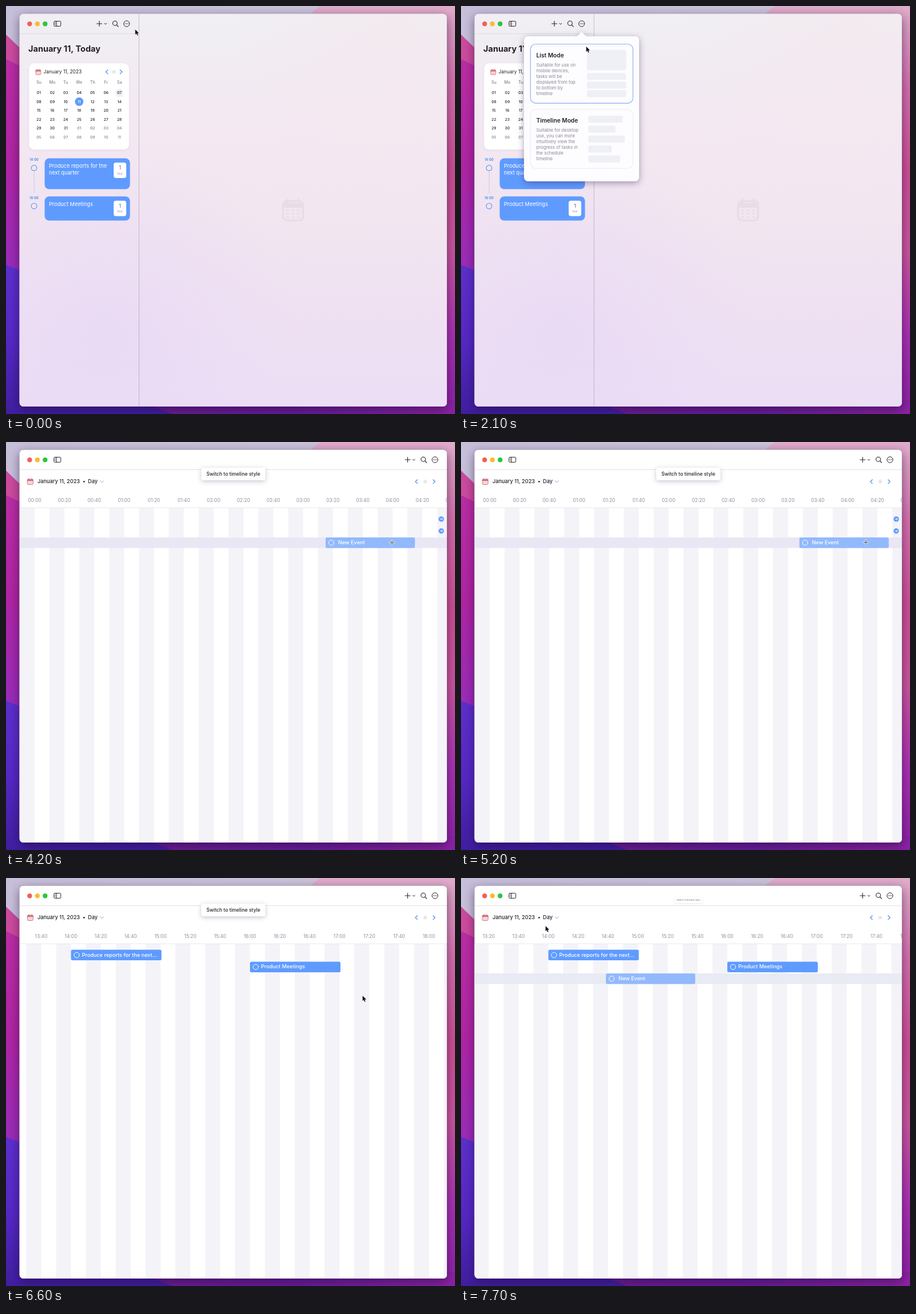
An HTML page with a canvas for the animation above (7.8 s loop, 784 px wide and 714 px high).

```html
<!DOCTYPE html>
<html lang="en">
<head>
<meta charset="utf-8">
<title>Calendar modes</title>
<style>
html, body { margin: 0; width: 100%; height: 100%; overflow: hidden; }
canvas { display: block; width: 784px; height: 714px; }
</style>
</head>
<body>
<canvas id="stage" width="784" height="714"></canvas>
<script>
let ctx = document.getElementById('stage').getContext('2d');
const LOOP = 7800, STEP = 100;
const BLUE = '#5f9bff', INK = '#232128', ROW = 20.85, HOUR = 156.25;

// Keyframes are [time, value...] rows, interpolated linearly.
function at(keys, t) {
  if (t <= keys[0][0]) return keys[0].slice(1);
  for (let i = 1; i < keys.length; i++) {
    const a = keys[i - 1], b = keys[i];
    if (t <= b[0]) {
      const k = (t - a[0]) / (b[0] - a[0]);
      return a.slice(1).map((v, j) => v + (b[j + 1] - v) * k);
    }
  }
  return keys[keys.length - 1].slice(1);
}
const POINTER = [
  [0, 226, 41], [500, 212, 29], [800, 211, 31], [1300, 214, 52], [1500, 218, 66],
  [2100, 219, 71], [2400, 228, 100], [3000, 274, 236], [3300, 276, 238], [3600, 290, 240],
  [3900, 470, 222], [4200, 674, 176], [4700, 684, 177], [5400, 716, 175], [5700, 762, 135],
  [5900, 762, 135], [6300, 700, 180], [6600, 623, 206], [6900, 540, 200], [7200, 426, 178],
  [7400, 369, 172], [7700, 148, 84]
];
const SCROLL = [[6000, 2187.5], [6400, 2187.5], [6600, 2124], [6900, 2085]];
const TIMELINE_ALPHA = [[3200, 0], [3300, 0.27], [3400, 0.62], [3500, 0.88], [3600, 1]];
const BADGE_X = [[3300, 585], [3400, 680], [3500, 733], [3600, 755], [3700, 760]];
const POPOVER = [[600, 0.8, 0], [700, 0.9, 0.5], [800, 1, 1], [3200, 1, 1],
  [3300, 0.987, 1], [3400, 0.92, 0.6], [3500, 0.86, 0.2], [3600, 0.8, 0]];
const TIP = [[3300, 0.3, 0], [3400, 0.44, 0.4], [3500, 0.87, 0.9], [3600, 1, 1],
  [7600, 1, 1], [7700, 0.44, 0.5]];

function fade(alpha, draw) {
  ctx.save();
  ctx.globalAlpha *= alpha;
  draw();
  ctx.restore();
}
function text(s, x, y, size, color = INK, weight = 400, align = 'left') {
  ctx.font = `${weight} ${size}px Inter, sans-serif`;
  ctx.textAlign = align;
  ctx.textBaseline = 'middle';
  ctx.fillStyle = color;
  ctx.fillText(s, x, y);
}
function rect(x, y, w, h, color) {
  ctx.fillStyle = color;
  ctx.fillRect(x, y, w, h);
}
function box(x, y, w, h, r, fill, stroke, width = 1) {
  ctx.beginPath();
  ctx.roundRect(x, y, w, h, r);
  paint(fill, stroke, width);
}
function circle(x, y, r, fill, stroke, width = 1) {
  ctx.beginPath();
  ctx.arc(x, y, r, 0, Math.PI * 2);
  paint(fill, stroke, width);
}
function paint(fill, stroke, width) {
  if (fill) { ctx.fillStyle = fill; ctx.fill(); }
  if (stroke) { ctx.strokeStyle = stroke; ctx.lineWidth = width; ctx.stroke(); }
}
function trace(points) {
  ctx.beginPath();
  for (let i = 0; i < points.length; i += 2) ctx.lineTo(points[i], points[i + 1]);
}
function line(points, color, width = 1) {
  trace(points);
  ctx.lineCap = ctx.lineJoin = 'round';
  paint(null, color, width);
}
function poly(points, fill) {
  trace(points);
  ctx.closePath();
  paint(fill);
}
function ramp(x0, y0, x1, y1, ...colors) {
  const g = ctx.createLinearGradient(x0, y0, x1, y1);
  colors.forEach((c, i) => g.addColorStop(i / (colors.length - 1), c));
  return g;
}
function glow(x, y, r, color) {
  const g = ctx.createRadialGradient(x, y, 0, x, y, r);
  g.addColorStop(0, color);
  g.addColorStop(1, color.replace(/[\d.]+\)$/, '0)'));
  rect(0, 0, 784, 714, g);
}
function shadow(color, blur, dy, draw) {
  ctx.save();
  ctx.shadowColor = color;
  ctx.shadowBlur = blur;
  ctx.shadowOffsetY = dy;
  draw();
  ctx.restore();
}
// Draws a still part once so that it can be reused as an image.
function layer(draw) {
  const canvas = document.createElement('canvas'), screen = ctx;
  canvas.width = 784;
  canvas.height = 714;
  ctx = canvas.getContext('2d');
  draw();
  ctx = screen;
  return canvas;
}

function wallpaper() {
  rect(0, 0, 784, 714, ramp(0, 0, 560, 0, '#c6bfd9', '#cbc3da'));
  poly([548, 0, 784, 0, 784, 714, 300, 714, 300, 200],
    ramp(0, 0, 0, 714, '#dfadca', '#d36eaa', '#cb4f93', '#c8559c', '#a931b1', '#8c20a4'));
  poly([0, 50, 60, 108, 60, 500, 0, 500], '#cb4a9d');
  poly([0, 93, 60, 122, 60, 500, 0, 500], ramp(0, 93, 0, 460, '#b92da2', '#ae24a3', '#982cb7'));
  poly([0, 453, 60, 476, 330, 714, 0, 714], ramp(0, 453, 0, 714, '#5c2fcb', '#5428c4', '#3f1e9f'));
  poly([230, 690, 784, 690, 784, 714, 290, 714], ramp(230, 0, 784, 0, '#6b1c94', '#671d9a', '#8a22a2'));
}
function windowPath() {
  ctx.beginPath();
  ctx.roundRect(23.5, 13.5, 746.5, 687.5, 7);
}
function inWindow(draw) {
  ctx.save();
  windowPath();
  ctx.clip();
  draw();
  ctx.restore();
}
function glass() {
  rect(0, 0, 784, 714, ramp(0, 14, 0, 701, '#f0eff3', '#f3e9f2', '#f2e6f0', '#efe1f2', '#ebdef5'));
  glow(170, 560, 330, 'rgba(232,216,246,0.7)');
  glow(680, 60, 280, 'rgba(246,230,237,0.5)');
}

function calendarIcon(x, y, s, color, body) {
  box(x - 5 * s, y - 4.5 * s, 10 * s, 9.7 * s, 2 * s, body, color, s * 0.9);
  rect(x - 5 * s, y - 3.6 * s, 10 * s, 2.4 * s, color);
  for (const dx of [-2.7, 2.7]) line([x + dx * s, y - 5.2 * s, x + dx * s, y - 4 * s], color, s);
  for (let i = 0; i < 9; i++)
    rect(x + (i % 3 * 2.7 - 3.3) * s, y + (Math.floor(i / 3) * 1.7 - 0.1) * s, 1.2 * s, 0.7 * s, color);
}
function arrows(left, mid, right, y, color) {
  line([left + 1.7, y - 3.3, left - 1.7, y, left + 1.7, y + 3.3], color, 1.2);
  line([right - 1.7, y - 3.3, right + 1.7, y, right - 1.7, y + 3.3], color, 1.2);
  circle(mid, y, 3.8, '#f1f0f3');
  circle(mid, y, 1.2, '#d2d0d7');
}
function toolbar(shift) {
  ['#f25f57', '#f8bc2f', '#2ac640'].forEach((c, i) => circle(41.3 + i * 13.5, 31.2, 4.2, c));
  box(83.7, 26.6, 12, 8.8, 1.8, null, INK, 1);
  line([88, 27, 88, 35], INK, 1);
  for (const y of [29, 30.8, 32.6]) line([85.3, y, 86.5, y], INK, 0.6);
  ctx.save();
  ctx.translate(shift, 0);
  line([158.5, 31, 167.5, 31], INK, 1.1);
  line([163, 26.5, 163, 35.5], INK, 1.1);
  line([171.8, 30.2, 173.8, 32.2, 175.8, 30.2], INK, 1);
  circle(190.3, 30.2, 3.9, null, INK, 1.1);
  line([193.2, 33.1, 196, 36], INK, 1.2);
  circle(210.7, 31, 5.1, null, INK, 1);
  for (const dx of [-2.4, 0, 2.4]) circle(210.7 + dx, 31, 0.75, INK);
  ctx.restore();
}

function taskCard(y, h, hour, lines) {
  text(hour, 49, y + 3.3, 5.6, '#5590ef', 700, 'center');
  circle(49, y + 17, 4.9, null, '#5b96f2', 1.1);
  box(67.5, y, 149, h, 8, BLUE);
  lines.forEach((s, i) => text(s, 75, y + 13.8 + i * 11.6, 9.2, '#fff'));
  box(188, y + 7.5, 22, 27, 4, '#fff');
  text('1', 199, y + 17.2, 8.7, '#6a72b8', 500, 'center');
  text('hour', 199, y + 27, 4.2, '#827ab5', 400, 'center');
}
function listView() {
  rect(24, 48, 208, 1, 'rgba(120,100,140,0.14)');
  rect(231.8, 14, 1, 687, 'rgba(130,110,150,0.38)');
  text('January 11, Today', 39, 76, 14.5, INK, 700);
  shadow('rgba(120,80,150,0.1)', 4, 1, () => box(40.3, 100.3, 174.5, 151, 9, '#fff'));
  calendarIcon(56.3, 115.6, 0.9, '#d3616c', '#fbeef0');
  text('January 11, 2023', 65.5, 115.5, 8.4);
  arrows(176, 188.5, 201, 115.3, '#4b86f0');
  const col = i => 57.4 + i * 23.45;
  ['Su', 'Mo', 'Tu', 'We', 'Th', 'Fr', 'Sa'].forEach((d, i) =>
    text(d, col(i), 134, 7.2, '#87838f', 500, 'center'));
  circle(col(6), 152, 7.3, '#f1f0f4');
  circle(col(3), 167.4, 7.4, BLUE);
  for (let i = 0; i < 42; i++) {
    const day = i < 31 ? i + 1 : i - 30;
    const color = i === 10 ? '#fff' : i === 32 ? '#77719a' : i < 31 ? INK : '#85818d';
    text(String(day).padStart(2, '0'), col(i % 7), 152 + Math.floor(i / 7) * 15.6, 6.7, color, 500, 'center');
  }
  taskCard(266.5, 54, '14:00', ['Produce reports for the', 'next quarter']);
  taskCard(333.2, 42.3, '16:00', ['Product Meetings']);
  for (let y = 291; y < 326; y += 3.1) rect(48.6, y, 1, 1.2, '#8a9fe0');
  calendarIcon(501.3, 357, 3.5, '#e6dde6');
}

function eventBar(x, y, w, label, color, gap) {
  box(x, y, w, 18.5, 2.5, color);
  circle(x + 10, y + 9.3, 4.6, null, '#fff', 1);
  text(label, x + gap, y + 9.3, 9.15, '#fff', 500);
}
function badge(x, y) {
  circle(x, y, 4.7, BLUE);
  line([x - 2.1, y, x + 2.1, y], '#fff', 0.9);
  line([x + 0.4, y - 1.7, x + 2.1, y, x + 0.4, y + 1.7], '#fff', 0.9);
}
function rowTop(i) { return 125.6 + ROW * i; }

// The draft event follows the pointer along the row under it.
function ghostAt(t) {
  if (t < 3900 || (t >= 5700 && t < 7000)) return null;
  const [x, y] = at(POINTER, Math.min(t, t < 5700 ? 5500 : 7400));
  const row = Math.max(2, Math.floor((y - 125) / ROW));
  return { x: x - 116, row, active: t < 5500 || (t >= 7000 && t < 7400) };
}
function timeline(t) {
  const scroll = t < 6000 ? 0 : at(SCROLL, t)[0];
  const slot = HOUR / 3, first = Math.floor(scroll / slot) - 1;
  rect(24, 14, 746, 687, '#fff');
  rect(24, 48, 746, 1, '#e2e0e6');
  calendarIcon(42.3, 69.3, 1, '#d0606c', '#fbf0f2');
  text('January 11, 2023', 55, 69.3, 9.2, INK, 500);
  circle(136.3, 69.3, 1.4, INK);
  text('Day', 143, 69.3, 9.2, INK, 500);
  line([164.2, 67.8, 167.3, 70.8, 170.4, 67.8], '#7ba4ea', 1);
  arrows(716.5, 732, 747.5, 69.3, '#4b86f0');

  for (let i = first; i < first + 18; i++) {
    const x = 50 + i * slot - scroll;
    rect(x - slot / 2, 115, slot / 2, 586, '#f4f3f8');
    if (i < 0) continue;
    const mins = i * 20;
    const label = [Math.floor(mins / 60), mins % 60].map(v => String(v).padStart(2, '0')).join(':');
    text(label, x, 102.3, 8.4, '#908c9d', 400, 'center');
  }
  rect(24, 114.5, 746, 1, '#e9e7ed');

  const ghost = ghostAt(t);
  if (ghost) {
    const y = rowTop(ghost.row) - 0.3;
    rect(24, y, 746, 18.5, t < 6000 ? '#eae7f5' : '#e8ebf4');
    eventBar(ghost.x, y, 156, 'New Event', '#92b9fc', 22);
  }
  if (t < 5900) {
    const [x] = at(BADGE_X, t);
    badge(x, rowTop(0) + 9.3);
    badge(x, rowTop(1) + 9.3);
  } else {
    const x = 50 + 14 * HOUR - (t < 6000 ? SCROLL[0][1] : scroll);
    eventBar(x, rowTop(0), 158, 'Produce reports for the next…', BLUE, 19);
    eventBar(x + 2 * HOUR, rowTop(1), 158, 'Product Meetings', BLUE, 19);
  }
}

function panel() {
  shadow('rgba(50,30,80,0.42)', 12, 3, () => {
    ctx.beginPath();
    ctx.roundRect(110, 53, 201, 253.7, 7);
    ctx.moveTo(201.5, 53.2);
    ctx.quadraticCurveTo(205, 52, 208.7, 47);
    ctx.quadraticCurveTo(210.7, 44.5, 212.7, 47);
    ctx.quadraticCurveTo(216.5, 52, 220, 53.2);
    ctx.closePath();
    paint('#fdfcfe');
  });
}
function option(y, title, lines, hot, pressed, bars) {
  box(121.3, y, 179, 103.3, 9, null, hot ? '#86adf7' : '#eeebf3', 1.1);
  fade(pressed ? 0.3 : 1, () => {
    text(title, 131.5, y + 20.3, 10.2, INK, 600);
    lines.forEach((s, i) => text(s, 131.5, y + 37 + i * 10, 7.75, '#8c8698'));
    for (const [x, top, w, h] of bars) box(x, y + top, w, h, 2.5, '#efeff6');
  });
}
function popover(t) {
  const [scale, alpha] = at(POPOVER, t);
  if (!alpha) return;
  const toTimeline = t >= 2700;
  fade(alpha, () => {
    ctx.translate(210.7, 45);
    ctx.scale(scale, scale);
    ctx.translate(-210.7, -45);
    ctx.drawImage(panelLayer, 0, 0);
    const wide = [[10, 35.8], [50.5, 12], [65.8, 12], [80.5, 12.2]].map(([y, h]) => [219.8, y, 68.5, h]);
    const steps = [60, 47, 63.5, 40.5, 55.5].map((w, i) => [222.5, 11 + i * 17.4, w, 12.2]);
    option(66.8, 'List Mode',
      ['Suitable for use on', 'mobile devices,', 'tasks will be', 'displayed from top', 'to bottom by', 'timeline'],
      t >= 1400 && !toTimeline, false, wide);
    option(181, 'Timeline Mode',
      ['Suitable for desktop', 'use, you can more', 'intuitively view the', 'progress of tasks in', 'the schedule', 'timeline'],
      toTimeline, t >= 3200, steps);
  });
}
function tip(t) {
  const [scale, alpha] = at(TIP, t);
  if (!alpha) return;
  fade(alpha, () => {
    ctx.translate(397, 25.7);
    ctx.scale(scale, scale);
    ctx.drawImage(tipLayer, -397, -25.7);
    text('Switch to timeline style', 0, 30.4, 8.5, INK, 500, 'center');
  });
}
function pointer(t) {
  const [x, y] = at(POINTER, t), ghost = ghostAt(t);
  if (ghost && ghost.active) {
    for (const [c, w] of [['#fff', 2.6], ['#3c4356', 1]]) {
      line([x - 4, y, x + 4, y], c, w);
      line([x, y - 4, x, y + 4], c, w);
    }
    return;
  }
  const p = [0, 0, 0, 9.2, 2.1, 7.3, 3.7, 10.8, 5.2, 10.1, 3.7, 6.7, 6.5, 6.6];
  ctx.save();
  ctx.translate(x - 0.4, y);
  trace(p);
  ctx.closePath();
  ctx.lineJoin = 'round';
  paint('#151318', '#fff', 1.5);
  poly(p, '#151318');
  ctx.restore();
}

const glassLayer = layer(() => {
  wallpaper();
  shadow('rgba(20,0,40,0.5)', 18, 5, () => { windowPath(); paint('#f0e6f2'); });
  inWindow(glass);
});
const listLayer = layer(() => {
  ctx.drawImage(glassLayer, 0, 0);
  inWindow(() => { listView(); toolbar(0); });
});
const panelLayer = layer(panel);
const tipLayer = layer(() =>
  shadow('rgba(60,40,90,0.28)', 8, 2, () => box(341, 45, 112, 22, 4, '#fff')));

function draw(t) {
  if (t < 3300) {
    ctx.drawImage(listLayer, 0, 0);
  } else {
    ctx.drawImage(glassLayer, 0, 0);
    inWindow(() => {
      fade(at(TIMELINE_ALPHA, t)[0], () => timeline(t));
      toolbar(538.3);
    });
  }
  windowPath();
  paint(null, 'rgba(60,20,80,0.22)', 0.7);
  popover(t);
  tip(t);
  pointer(t);
}

const start = performance.now();
let shown = -1;
function tick() {
  const t = Math.floor((performance.now() - start) % LOOP / STEP) * STEP;
  if (t !== shown) draw(shown = t);
  requestAnimationFrame(tick);
}
tick();
</script>
</body>
</html>
```
